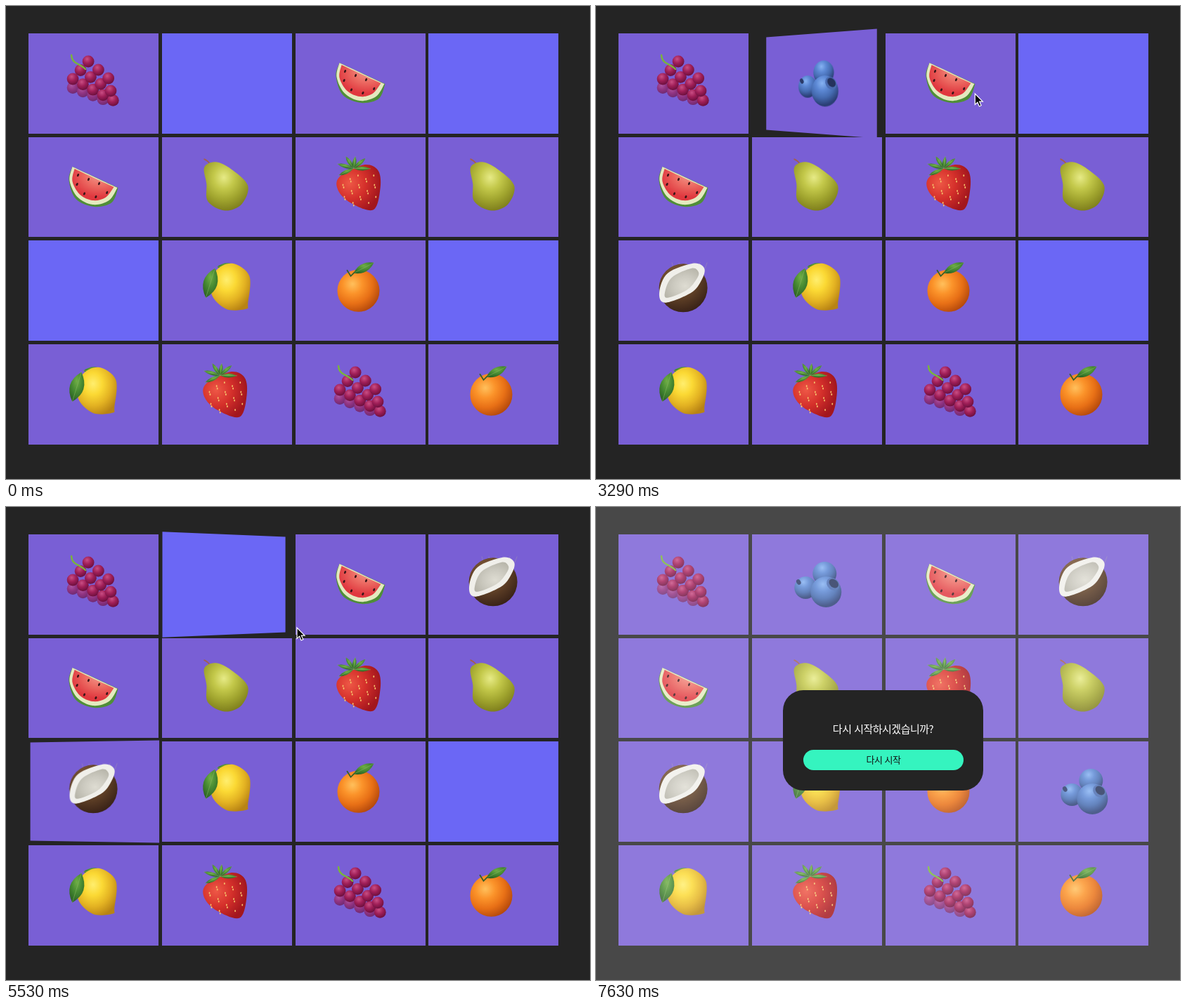
Recreate the animation shown at these times as an HTML page. Size 831x674 px, loop 8680 ms.

```html
<!DOCTYPE html>
<html lang="ko">
<head>
<meta charset="utf-8">
<title>Fruit memory game</title>
<style>
  html, body { margin: 0; width: 100%; height: 100%; overflow: hidden; background: #242424; }
  body { position: relative; font-family: "Noto Sans CJK KR", "Noto Sans CJK", sans-serif; letter-spacing: -.5px; }
  #board { position: absolute; inset: 0; isolation: isolate; }
  .cell { position: absolute; z-index: 1; perspective: 600px; }
  .card { width: 100%; height: 100%; background: #6b67f5; }
  .card svg { display: block; width: 100%; height: 100%; visibility: hidden; }
  .card.open { background: #795fd5; }
  .card.open svg { visibility: visible; }
  #veil { position: absolute; inset: 0; background: rgba(255, 255, 255, .165); }
  #dialog { position: absolute; left: 266px; top: 261px; width: 285px; height: 143px;
    border-radius: 29px; background: #242424; color: #fff; text-align: center; }
  #dialog p { position: absolute; margin: 0; top: 44px; width: 100%; font-size: 15px; line-height: 22px; font-weight: 500; }
  #dialog div { position: absolute; left: 29px; top: 85px; width: 228px; height: 29px;
    border-radius: 15px; background: #35f4bf; color: #111; font-size: 13px; line-height: 27px; }
  #cursor { position: absolute; left: 0; top: 0; overflow: visible; }
</style>
</head>
<body>
<svg width="0" height="0" style="position:absolute"><defs id="defs"></defs></svg>
<div id="board"></div>
<div id="veil"><div id="dialog"><p>다시 시작하시겠습니까?</p><div>다시 시작</div></div></div>
<svg id="cursor" width="12" height="19">
  <path d="M0 0V15.5L3.6 12.2 6.1 18 8.8 16.8 6.3 11.2H11Z" fill="#000" stroke="#fff" stroke-width="1.2"/>
</svg>
<script>
const LOOP = 8680, STEP = 70, FLIP = 1050, DIALOG_AT = 6165;
const W = 185.1, H = 142.8;
const $ = id => document.getElementById(id);
const cellX = col => 31.9 + 189.8 * col, cellY = row => 39 + 147.6 * row;
const loop = (n, draw) => Array.from({ length: n }, (_, i) => draw(i)).join('');

// Radial shading around a highlight, colours from light to dark
const shade = (id, x, y, ...colors) => `<radialGradient id="${id}" cx="${x}" cy="${y}" r=".7">` +
  colors.map((c, i) => `<stop offset="${i / (colors.length - 1)}" stop-color="${c}"/>`).join('') + '</radialGradient>';
$('defs').innerHTML =
  shade('grape', .4, .3, '#c94e84', '#a01f58', '#6d0f3e') +
  shade('flesh', .65, .2, '#f29a8c', '#ec6a62', '#e0383f') +
  shade('pear', .45, .32, '#e6ea86', '#c3c84a', '#a0a42e', '#7d7d1c') +
  shade('berry', .3, .4, '#ee5846', '#d5302b', '#a2161d') +
  shade('lemon', .4, .35, '#ffee6e', '#fbd934', '#e3b222', '#b88314') +
  shade('orange', .36, .34, '#ffc05c', '#fb932a', '#e87016', '#b64a0c') +
  shade('husk', .4, .3, '#8a6242', '#664529', '#3b2418') +
  shade('hollow', .6, .6, '#dedcd2', '#cbc9bf', '#b4b2a6') +
  shade('blue', .4, .25, '#86b2f2', '#5c88d4', '#456bb0', '#2b3f76') +
  shade('leaf', .5, .3, '#6fae45', '#478a32', '#2c6424');

const oval = (x, y, rx, ry, turn, fill) =>
  `<ellipse rx="${rx}" ry="${ry}" fill="${fill}" transform="translate(${x} ${y}) rotate(${turn})"/>`;
const ball = (x, y, r, fill) => oval(x, y, r, r, 0, fill);
const line = (d, color, width) => `<path d="${d}" fill="none" stroke="${color}" stroke-width="${width}" stroke-linecap="round"/>`;

// Smooth closed curve through points; a repeated point makes a corner
function blob(text, fill) {
  const pts = text.split(' ').map(p => p.split(',').map(Number));
  const at = i => pts[(i + pts.length) % pts.length];
  const d = pts.map((p, i) => {
    const prev = at(i - 1), next = at(i + 1), after = at(i + 2);
    if (p.join() === next.join()) return '';
    const c1 = p.map((v, k) => v + (next[k] - prev[k]) / 6), c2 = next.map((v, k) => v - (after[k] - p[k]) / 6);
    return `C${[c1, c2, next]}`;
  });
  return `<path d="M${pts[0]}${d.join('')}Z" fill="${fill}"/>`;
}

function leaf(x, y, tipX, tipY, w) {
  const len = Math.hypot(tipX - x, tipY - y), nx = (y - tipY) / len * 2 * w, ny = (tipX - x) / len * 2 * w;
  const mx = (x + tipX) / 2, my = (y + tipY) / 2;
  return `<path d="M${x} ${y}Q${mx + nx} ${my + ny} ${tipX} ${tipY}Q${mx - nx} ${my - ny} ${x} ${y}" fill="url(#leaf)"/>` +
    line(`M${x} ${y}L${tipX} ${tipY}`, '#8fbb6a', .5);
}

// Bunch in slanted rows that fan out; the back row is faint
const grapeRow = r => `<g opacity="${r > 2 ? .65 : 1}">` + loop(r > 2 ? 4 : 3 + r, i =>
  ball(117 - 11 * Math.min(r, 2) + 14.3 * i, 79 + 12.5 * r + (12 - 2.2 * r) * i, 8.4, 'url(#grape)')) + '</g>';

const melonSeed = (x, y) => oval(x, y, 1.4, 2.2, 25, '#3a1518');
const melonSeeds = () => loop(3, i => melonSeed(482 + 15 * i, 93 + 6 * i)) +
  loop(4, i => melonSeed(506 + 27 * Math.cos(2.8 - .64 * i), 97 + 27 * Math.sin(2.8 - .64 * i)));

const berrySeeds = () => loop(30, i => {
  const x = 478 + 11 * (i % 5) + i / 5, y = 241 + 8.5 * Math.floor(i / 5) + 5 * (i % 2);
  return Math.hypot(x - 504, y - 257) < 29 ? oval(x, y, .9, 1.5, 0, '#f5c36a') : '';
});
const berryLeaves = () => loop(6, i => {
  const a = 2.7 + .72 * i, len = 16 + 8 * Math.abs(Math.cos(a));
  return leaf(494, 231, 494 + len * Math.cos(a), 231 + len * Math.sin(a), 2.8);
});

// Each fruit is drawn in stage coordinates at its home cell [column, row]
const fruits = {
  grapes: [0, 0, () => loop(4, i => grapeRow(3 - i)) + line('M93 70Q93 78 101 82T113 90', '#79b63a', 2.4)],
  melon: [2, 0, () =>
    blob('474,81 474,81 469,100 479,127 505,138 530,132 539,111 539,111', '#4f8e38') +
    blob('474,81 474,81 470,101 481,124 503,135 526,129 538,111 538,111', '#e4e9bf') +
    blob('477,84 477,84 474,102 485,121 503,129 521,125 533,110 533,110', 'url(#flesh)') + melonSeeds()],
  pear: [1, 1, () => line('M282 218Q287 220 291 226', '#a2604e', 2) +
    blob('282,229 300,222 323,234 344,256 335,282 311,291 287,278 285,253', 'url(#pear)')],
  strawberry: [2, 1, () =>
    blob('474,243 472,262 490,280 522,290 532,260 529,234 508,226', 'url(#berry)') + berrySeeds() + berryLeaves()],
  lemon: [1, 2, () => leaf(300, 372, 328, 371, 5) +
    blob('298,378 322,367 346,385 344,424 341,432 313,432 292,410', 'url(#lemon)') +
    leaf(297, 374, 284, 416, 10)],
  orange: [2, 2, () => ball(501, 406, 30, 'url(#orange)') + leaf(494, 381, 523, 366, 6) +
    line('M485 377L490 385 495 380', '#35602a', 1.8)],
  coconut: [0, 2, () => loop(6, i => line(`M${110 + 9 * i} 374l${i - 2} -8`, '#9b8bb5', .6)) +
    ball(124, 402, 34.5, 'url(#husk)') +
    blob('90,408 102,381 138,367 154,374 150,391 135,409 98,423', '#f0efea') +
    blob('98,408 108,387 136,374 146,380 142,391 129,405 102,416', 'url(#hollow)')],
  blueberry: [1, 0, () => ball(325, 95, 17, 'url(#blue)') + ball(298, 115, 16, 'url(#blue)') +
    oval(288, 107, 4, 3, 60, '#2a3a68') + ball(327, 121, 22, 'url(#blue)') +
    oval(337, 110, 10, 8, 40, '#4a6cb0') + oval(338, 109, 7.5, 5.5, 40, '#25335c')]
};

const layout = `grapes blueberry melon coconut melon pear strawberry pear
  coconut lemon orange blueberry lemon strawberry grapes orange`.split(/\s+/);
// Start times of each hidden card's flips: open, close, open ...
const flips = { 1: [2745, 3821, 5417], 3: [3836], 8: [1230, 3836, 4748], 11: [6165] };
// Pointer stops: time, x, y
const stops = [[70, 440, 674], [1230, 195, 381], [1820, 672, 106], [2310, 670, 106], [2745, 393, 125],
  [3836, 686, 125], [4060, 690, 357], [4748, 190, 388], [5417, 399, 150], [5530, 414, 172],
  [6165, 744, 425], [6230, 744, 425], [7140, 440, 565], [7420, 438, 610], [7630, 447, 637]];

const cards = layout.map((name, i) => {
  const [col, row, art] = fruits[name];
  const cell = document.createElement('div');
  cell.className = 'cell';
  cell.style.cssText = `left:${cellX(i % 4)}px;top:${cellY(i >> 2)}px;width:${W}px;height:${H}px`;
  cell.innerHTML = `<div class="card open"><svg viewBox="${cellX(col)} ${cellY(row)} ${W} ${H}">${art()}</svg></div>`;
  $('board').append(cell);
  return cell.firstChild;
});

// cubic-bezier(.25, .1, .25, 1)
function ease(x) {
  if (x >= 1) return 1;
  const curve = (s, a, b) => 3 * a * s * (1 - s) ** 2 + 3 * b * s * s * (1 - s) + s ** 3;
  let lo = 0, hi = 1;
  for (let i = 0; i < 20; i++) {
    const mid = (lo + hi) / 2;
    if (curve(mid, .25, .25) < x) lo = mid; else hi = mid;
  }
  return curve(lo, .1, 1);
}

function turn(card, starts, t) {
  const count = starts.filter(s => s <= t).length;
  const p = count ? ease((t - starts[count - 1]) / FLIP) : 1;
  const angle = 180 * (count % 2 ? p : 1 - p);
  const open = angle > 90;
  card.classList.toggle('open', open);
  card.style.transform = p < 1 ? `rotateY(${open ? angle - 180 : angle}deg)` : 'none';
  card.parentNode.style.zIndex = p < 1 ? 0 : 1; // moving cards pass under their neighbours
}

function movePointer(t) {
  const shown = t >= 70 && t < 7210 || t >= 7420 && t < 7630;
  $('cursor').style.display = shown ? 'block' : 'none';
  if (!shown) return;
  const i = stops.findIndex(s => s[0] > t);
  const [t0, x0, y0] = stops[i - 1], [t1, x1, y1] = stops[i];
  const u = (t - t0) / (t1 - t0), p = u * u * (3 - 2 * u);
  $('cursor').style.transform = `translate(${x0 + (x1 - x0) * p}px, ${y0 + (y1 - y0) * p}px)`;
}

function draw(now) {
  const t = Math.floor(now % LOOP / STEP) * STEP;
  for (const i in flips) turn(cards[i], flips[i], t);
  $('veil').style.display = t >= DIALOG_AT ? 'block' : 'none';
  movePointer(t);
}

let start;
function tick(now) {
  start ??= now;
  draw(now - start);
  requestAnimationFrame(tick);
}
draw(0);
requestAnimationFrame(tick);
</script>
</body>
</html>
```
